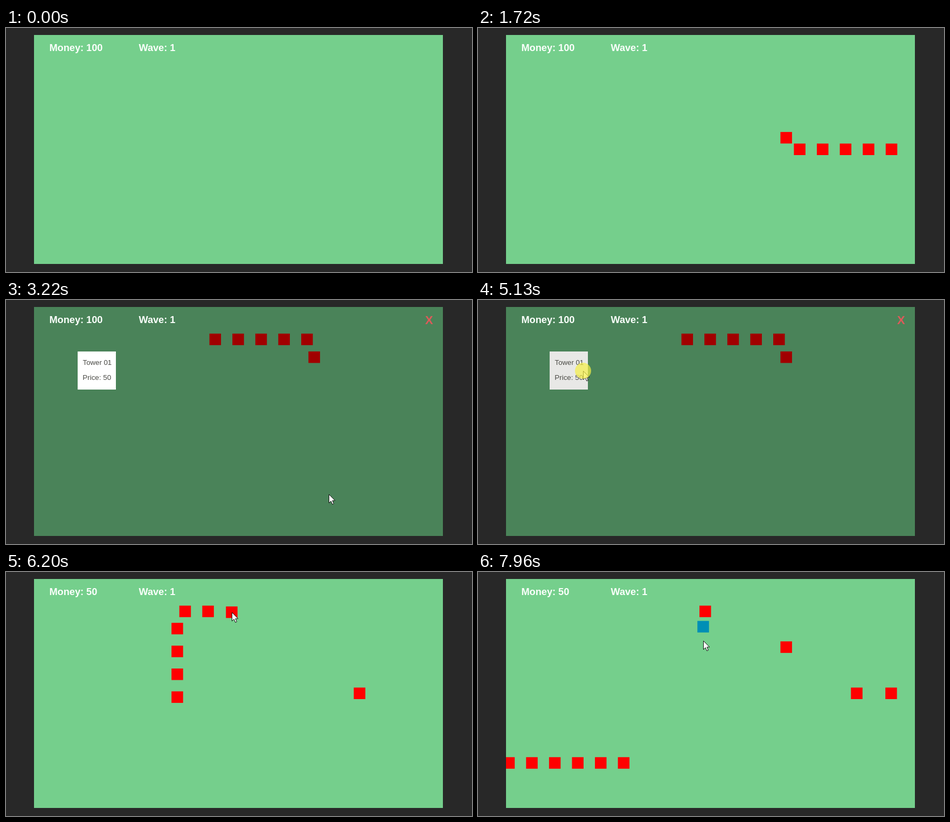
Recreate the animation shown at these times as an HTML page with a canvas. Size 865 px wide and 455 px high, loop 8 s.

```html
<!DOCTYPE html>
<html lang="en">
<head>
<meta charset="utf-8">
<title>Tower defense</title>
<style>
html, body { margin: 0; width: 100%; height: 100%; overflow: hidden; background: #282828; }
canvas { display: block; }
</style>
</head>
<body>
<canvas id="stage" width="865" height="455"></canvas>
<script>
const ctx = document.getElementById('stage').getContext('2d');
const LOOP = 8000, SIZE = 21.5, SPEED = 0.2155, SNAP = 4, GAP = 42.6;
const SPAWN = 481, SHOP_OPEN = 3164, BUY = 5130, SHOP_CLOSE = 5151, PLACE = 7400;
const FIELD = [52, 13, 759, 427];
const FONT = '"Liberation Sans", Arial, sans-serif';

// Top left corners of the route; enemies snap to a corner when near it.
const RIGHT = 561.4, LEFT = 307.2, TOP = 62.7, MIDDLE = 215.5, BOTTOM = 345.3;
const ROUTE = [[811, MIDDLE], [RIGHT, MIDDLE], [RIGHT, TOP], [LEFT, TOP], [LEFT, BOTTOM], [-400, BOTTOM]];

// Spawn slots, one GAP of travel each: a tight group, then stragglers.
const SLOTS = [0, 1, 2, 3, 4, 5, 15, 20, 25, 26.5];

// Pointer moves, each starting where the last one ended.
const ENTRY = { x: 805, y: 423 };
const MOVES = [
  { from: 2750, to: 3164, x: 599, y: 362 },
  { from: 3780, to: 4470, x: 195, y: 132, bend: [237, 350] },
  { from: 5150, to: 5850, x: 419, y: 75, bend: [430, 190] },
  { from: 6700, to: 6850, x: 418, y: 84 },
  { from: 7050, to: 7250, x: 418, y: 102 },
  { from: 7650, to: 7900, x: 418, y: 128 }
];

const ease = p => p * p * (3 - 2 * p);
const mix = (a, b, p) => a + (b - a) * p;

function pointerAt(t) {
  let { x, y } = ENTRY;
  for (const m of MOVES) {
    if (t < m.from) break;
    const p = ease(Math.min(1, (t - m.from) / (m.to - m.from)));
    const [bx, by] = m.bend || [(x + m.x) / 2, (y + m.y) / 2];
    x = mix(mix(x, bx, p), mix(bx, m.x, p), p);
    y = mix(mix(y, by, p), mix(by, m.y, p), p);
  }
  return [x, y];
}

function routeAt(dist) {
  for (let i = 1; i < ROUTE.length; i++) {
    const [x0, y0] = ROUTE[i - 1], [x1, y1] = ROUTE[i];
    const len = Math.hypot(x1 - x0, y1 - y0);
    if (dist < len - SNAP) return [mix(x0, x1, dist / len), mix(y0, y1, dist / len)];
    dist -= len - SNAP;
  }
  return ROUTE[ROUTE.length - 1];
}

function rect(color, x, y, w = SIZE, h = SIZE) {
  ctx.fillStyle = color;
  ctx.fillRect(x, y, w, h);
}

function text(str, x, y, font, color) {
  ctx.font = font + ' ' + FONT;
  ctx.fillStyle = color;
  ctx.fillText(str, x, y);
}

// The game stands still while the shop is open.
function drawEnemies(t) {
  const pause = Math.max(0, Math.min(t, SHOP_CLOSE) - SHOP_OPEN);
  const lead = SPEED * (t - pause - SPAWN);
  for (const slot of SLOTS) {
    const dist = lead - slot * GAP;
    if (dist >= SNAP) rect('#ff0000', ...routeAt(dist));
  }
}

function drawTower(t) {
  const [x, y] = pointerAt(Math.min(t, PLACE));
  const blocked = Math.abs(y - 73) < 9 || Math.abs(x - 318) < 9;
  rect(blocked ? '#ff0000' : '#008fb5', x - SIZE / 2, y - SIZE / 2);
}

function drawShop(t) {
  rect('rgba(0,0,0,0.37)', ...FIELD);
  rect(t < BUY ? '#ffffff' : '#e8e8e6', 133, 96, 71, 71);
  text('Tower 01', 142.6, 121, '13.2px', '#4b4b46');
  text('Price: 50', 142.3, 149, '13.4px', '#4b4b46');
  text('X', 778, 45, 'bold 22px', '#de5a5a');
}

function drawPointer(t) {
  if (t < MOVES[0].from) return;
  ctx.save();
  ctx.translate(...pointerAt(t));
  const arrow = new Path2D('M.5 .5V16.5L4.2 13 6.8 19 9.4 17.9 6.9 12H11.8Z');
  ctx.fillStyle = '#fff';
  ctx.fill(arrow);
  ctx.strokeStyle = '#111';
  ctx.stroke(arrow);
  if ([BUY, PLACE].some(click => t >= click && t < click + 300)) {
    ctx.fillStyle = 'rgba(245,240,70,0.7)';
    ctx.beginPath();
    ctx.arc(0, 0, 15, 0, Math.PI * 2);
    ctx.fill();
  }
  ctx.restore();
}

function draw(t) {
  rect('#282828', 0, 0, 865, 455);
  rect('#75cf8c', ...FIELD);
  ctx.save();
  ctx.beginPath();
  ctx.rect(...FIELD);
  ctx.clip();
  drawEnemies(t);
  if (t >= SHOP_CLOSE) drawTower(t);
  ctx.restore();
  if (t >= SHOP_OPEN && t < SHOP_CLOSE) drawShop(t);
  text('Money: ' + (t < SHOP_CLOSE ? 100 : 50), 80.4, 42.6, 'bold 18.2px', '#fafffb');
  text('Wave: 1', 246.4, 42.6, 'bold 18.2px', '#fafffb');
  drawPointer(t);
}

const start = performance.now();
function tick() {
  draw((performance.now() - start) % LOOP);
  requestAnimationFrame(tick);
}
tick();
</script>
</body>
</html>
```
